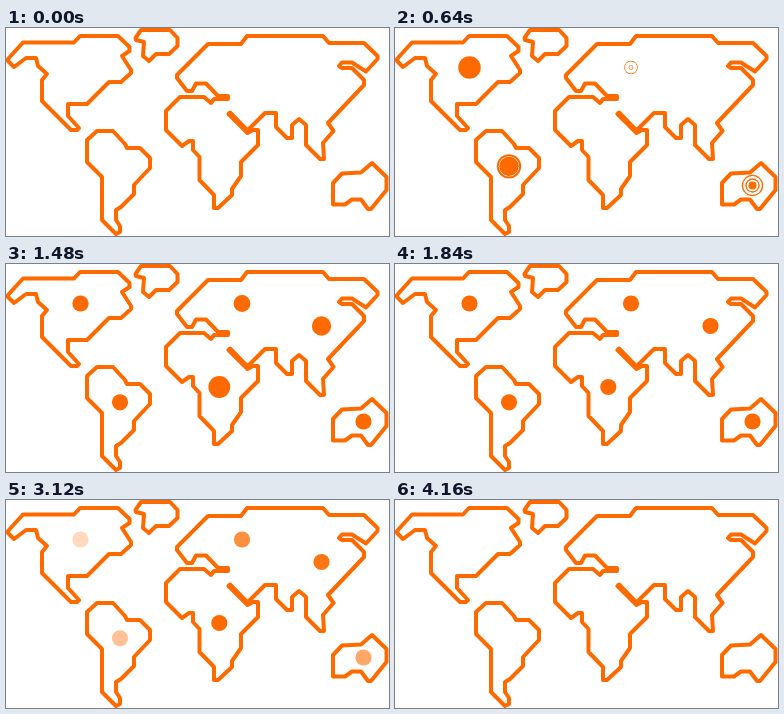
These frames come from a looping animation (383x208 px, 4360 ms). An HTML page:

```html
<!DOCTYPE html>
<html>
<head>
<meta charset="utf-8">
<style>
html, body { margin: 0; width: 100%; height: 100%; overflow: hidden; background: #fff; }
svg { display: block; width: 383px; height: 208px; }
</style>
</head>
<body>
<svg id="map" viewBox="0 0 383 208">
  <g fill="none" stroke="#ff6a00" stroke-width="4" stroke-linejoin="round" stroke-linecap="round">
    <path d="M2 31V33L8 39L20 30H30L32 38L41 46L36 52V73L65 102L71 102L73 100L62 88V76H81L103 54H115L125 45V42L116 28L123.5 23V19L112 8H74L68 14.5H17Z"/>
    <path d="M129.5 10L135 2H164L171.5 10V18L163 26H150L143 33L137 28L138 14L130 12Z"/>
    <path d="M81 112L91 103H107L119 116L121 120H134L144 130V140L128 157V166L115 179L110 182V192L114 198V204L110 206L96 192V149L81 134Z"/>
    <path d="M222.5 86L241.5 105L247 102H252V117L235 134V148L226 161V167L212 180H208V167L193.5 152V129L187 122V113H183L176 118L160 102V83L174 69H198L205 75L208 71H222V68H212L200 55.5H190L186 63H181L171 50V47L202 16H235L241 8H317L323 15H358L371.5 28V31L360 43.5L346 34.5H336L333 38L336 40H346L358 52V57L322 95L327.5 103L317 115L318 131H314L300 117V97L293 91L286 97V110H281L270 99V85H259L241.5 102.5L224 84.5Z"/>
    <path d="M327 155L336 145.5L355 144.5L366 135L380.5 149V162L365 181H362L355 171.5H346L339 176.5H327Z"/>
  </g>
</svg>
<script>
const LOOP = 4360, STEP = 40, STAGGER = 160, RISE = 520, FADE_START = 2400, FADE = 960;
const PEAK = 12.2, REST = 8.1;
const spots = [[74.5, 39.5], [114, 138.3], [357.5, 157.5], [236, 39.5], [315.5, 62], [213.3, 123]];

const clamp = x => Math.min(1, Math.max(0, x));
const easeOut = (x, power) => 1 - (1 - clamp(x)) ** power;

function add(tag, parent, attrs) {
  const el = document.createElementNS('http://www.w3.org/2000/svg', tag);
  for (const key in attrs) el.setAttribute(key, attrs[key]);
  return parent.appendChild(el);
}

const markers = spots.map(([cx, cy]) => {
  const group = add('g', map);
  const discs = [0, 1, 2, 3, 4].map(i => add('circle', group, { cx, cy, fill: i % 2 ? '#fff' : '#ff6a00' }));
  return { group, discs };
});

// Radii of the stacked discs, alternately orange and white
function radii(t) {
  if (t >= RISE) return [PEAK + (REST - PEAK) * clamp((t - RISE) / RISE), 0, 0, 0, 0];
  const outer = PEAK * easeOut(t / RISE, 2.2);
  const middle = 9.6 * easeOut((t - 100) / 380, 1.6);
  const line = t / 240;
  return [outer, outer - line, middle, middle - line, (t - 200) / 30];
}

function draw(elapsed) {
  const t = Math.min(4160, Math.floor(elapsed % LOOP / STEP) * STEP);
  markers.forEach(({ group, discs }, i) => {
    const delay = i * STAGGER;
    const sizes = radii(Math.max(0, t - delay));
    discs.forEach((disc, k) => disc.setAttribute('r', Math.max(0, sizes[k])));
    group.setAttribute('opacity', 1 - clamp((t - FADE_START - delay) / FADE));
  });
}

const start = performance.now();
function tick() {
  draw(performance.now() - start);
  requestAnimationFrame(tick);
}
tick();
</script>
</body>
</html>
```
